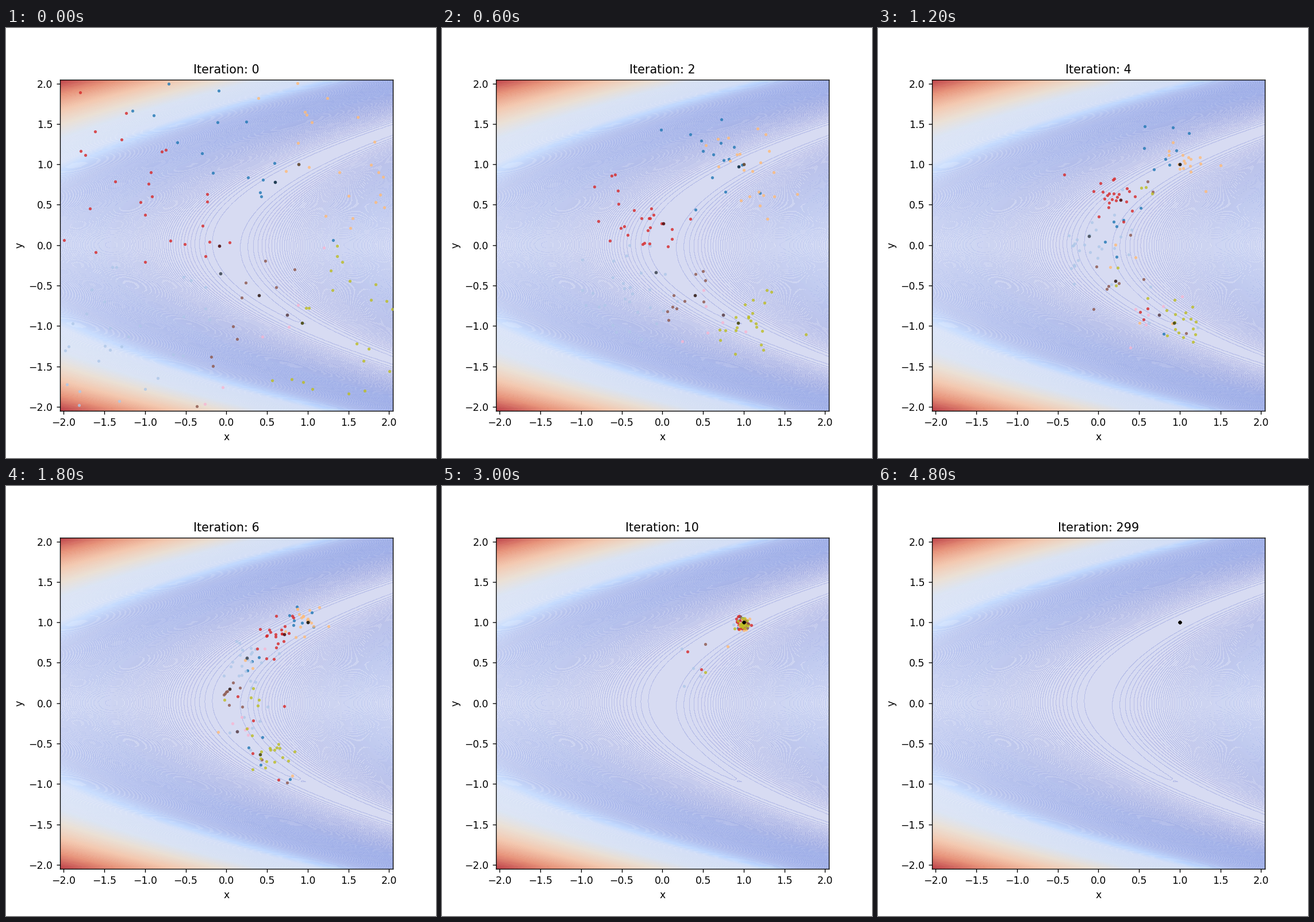
Animation of 748x748 px, one loop 5.1 s. Source, as a matplotlib script:

```python
import numpy as np
import matplotlib.pyplot as plt
from matplotlib.animation import FuncAnimation
from matplotlib.colors import LinearSegmentedColormap

SIZE = 748
LIM = 2.048
STEPS = [*range(11), 50, 100, 150, 200, 250, 299]
HUES = [0, 1, 3, 6, 10, 13, 16]
# one leader per swarm
HEADS = np.array([(.60, .78), (-.07, -.35), (.89, 1.0), (-.09, -.01),
                  (.40, -.62), (.75, -.86), (.93, -.96)])

rng = np.random.default_rng(8)
starts = np.vstack([HEADS, rng.uniform(-LIM, LIM, (130, 2))])
group = np.linalg.norm(starts[:, None] - HEADS, axis=2).argmin(axis=1)


def lead(k):
    """Leaders follow the valley x = y² to (1, 1); the lower ones set off later."""
    x0, y0 = HEADS.T
    delay = np.maximum(0, -5.5 * y0)
    span = 7 - np.maximum(delay / 2, 6 * y0)
    t = np.clip((k - delay) / span, 0, 1)
    y = y0 + (1 - y0) * t
    x = y**2 + (x0 - y0**2) * (1 - t)
    return np.c_[x, y]


def particles(k):
    """Swarms contract onto their leaders while some strays roam the valley."""
    heads = lead(k)
    goal = heads[group]
    if k == 0:
        return starts
    if k > 10:
        return goal
    rng = np.random.default_rng(k)
    n = len(starts)
    pts = goal + (starts - goal) * .58**k + rng.normal(0, .24 - .02 * k, (n, 2))
    y = rng.uniform(np.interp(k, [8, 10], [-1.1, .05]), .8, n)
    x = .3 + .5 * y**2 + rng.normal(0, .17, n)
    stray = rng.random(n) < np.interp(k, [2, 4, 8, 10], [0, .25, .25, .08])
    pts[stray] = np.c_[x, y][stray]
    pts[:len(heads)] = heads
    return pts


tones = LinearSegmentedColormap.from_list('tones', [
    (0, '#3b4cc0'), (.06, '#5470d6'), (.16, '#8a9ee6'), (.21, '#a5c8ff'),
    (.24, '#c6d5f5'), (.36, '#d0dcf2'), (.46, '#e6dacd'), (.6, '#f3c0a3'),
    (.78, '#e6886c'), (1, '#b8303a')])

fig, ax = plt.subplots(figsize=(6, 6), dpi=SIZE / 6)
grid = np.linspace(-LIM, LIM, 100)
X, Y = np.meshgrid(grid, grid)
Z = (1 - Y)**2 + 100 * (X - Y**2)**2
ax.contourf(X, Y, Z, 1000, cmap=tones, alpha=.2)
ax.set(xlim=(-LIM, LIM), ylim=(-LIM, LIM), xlabel='x', ylabel='y')
title = ax.set_title('Iteration: 0')

dots = [ax.scatter([], [], s=9, lw=0, alpha=.8, color=plt.cm.tab20(h), zorder=3)
        for h in HUES]
leaders = ax.scatter([], [], s=11, lw=0, alpha=.55, color='black', zorder=4)


def update(i):
    k = STEPS[i]
    title.set_text(f'Iteration: {k}')
    pts = particles(k)
    for g, dot in enumerate(dots):
        dot.set_offsets(pts[group == g])
    leaders.set_offsets(lead(k))
    return [title, leaders, *dots]


anim = FuncAnimation(fig, update, frames=len(STEPS), interval=300, repeat=True)
plt.show()
```
